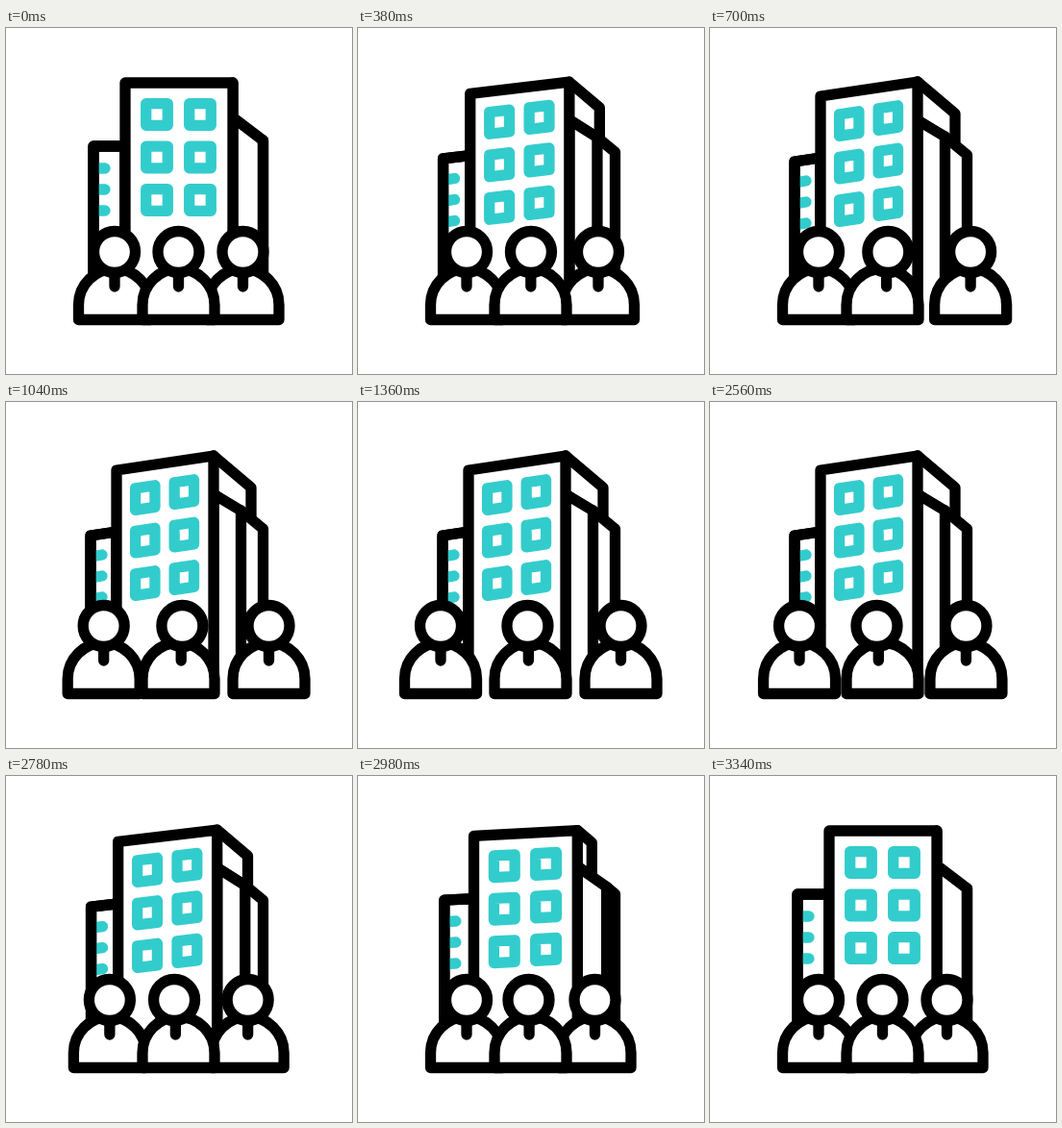
Write an HTML page with a canvas that moves like this. It is 360x360 px and loops after 3.36 s.

```html
<!DOCTYPE html>
<html lang="en">
<head>
<meta charset="utf-8">
<title>Office team</title>
<style>
  html, body { margin: 0; width: 100%; height: 100%; overflow: hidden; background: #fff; }
  canvas { display: block; width: 360px; height: 360px; }
</style>
</head>
<body>
<canvas id="stage" width="360" height="360"></canvas>
<script>
const ctx = document.getElementById('stage').getContext('2d');
const LOOP = 3360, CYAN = '#33cccc', GROUND = 292;

const mix = (a, b, p) => a + (b - a) * p;

// Smooth 0..1 ramp between two times
function ramp(t, start, end) {
  const u = Math.min(1, Math.max(0, (t - start) / (end - start)));
  return u * u * (3 - 2 * u);
}

function shape(points, { closed = false, fill = '#fff', stroke = '#000' } = {}) {
  ctx.beginPath();
  points.forEach(([x, y]) => ctx.lineTo(x, y));
  if (closed) ctx.closePath();
  if (fill) { ctx.fillStyle = fill; ctx.fill(); }
  ctx.strokeStyle = stroke;
  ctx.stroke();
}

function drawBuilding(p) {
  const left = mix(124, 115, p), right = mix(236, 216, p);
  const topLeft = mix(57, 71, p), topRight = mix(57, 56, p);
  const sideX = mix(236, 255, p), sideY = mix(57, 89, p);
  const wingX = mix(267.5, 244.5, p), wingY = mix(117, 113, p);
  const joinY = mix(93, 96, p), farY = mix(117, 132, p);
  const annexX = mix(91, 88, p), annexY = mix(123, 139, p);

  // Left annex with its half-hidden windows
  const annex = [[left, GROUND], [left, mix(123, 135, p)], [annexX, annexY], [annexX, GROUND]];
  shape(annex);
  for (let i = 0; i < 3; i++) {
    const y = mix(146, 160, p) + i * 22;
    shape([[annexX + 6, y], [mix(103, 100, p), y - p]], { fill: null, stroke: CYAN });
  }
  shape(annex, { fill: null });

  // Side wall, then the lower wing in front of it
  shape([[right, topRight], [sideX, sideY], [sideX, mix(joinY, 121, p)], [right, joinY]]);
  shape([[right, GROUND], [right, joinY], [wingX, wingY], [267.5, farY], [267.5, GROUND]]);
  shape([[wingX, wingY], [wingX, GROUND]]);

  // Front wall
  shape([[left, GROUND], [left, topLeft], [right, topRight], [right, GROUND]]);
  const onWall = (x, y) => {
    const u = (x - 124) / 112;
    return [mix(left, right, u), y - 57 + mix(topLeft, topRight, u)];
  };
  for (const x of [157, 202]) {
    for (const y of [90, 134.5, 179]) {
      const corners = [[-1, -1], [1, -1], [1, 1], [-1, 1]];
      shape(corners.map(([a, b]) => onWall(x + a * 11.3, y + b * 11.3)),
        { closed: true, stroke: CYAN });
    }
  }
}

function drawPerson(x, look = 0) {
  ctx.fillStyle = '#fff';
  ctx.strokeStyle = '#000';
  ctx.beginPath();
  ctx.moveTo(x - 37.5, 303.5);
  ctx.arc(x, 288, 37.5, Math.PI, 0);
  ctx.lineTo(x + 37.5, 303.5);
  ctx.closePath();
  ctx.fill();
  ctx.stroke();
  shape([[x + look * 0.7, 255], [x + look * 0.7, 269]]);
  ctx.beginPath();
  ctx.arc(x + look, 233, 21.5, 0, 7);
  ctx.fill();
  ctx.stroke();
}

function draw(t) {
  ctx.fillStyle = '#fff';
  ctx.fillRect(0, 0, 360, 360);
  ctx.lineWidth = 11.3;
  ctx.lineJoin = ctx.lineCap = 'round';

  const back = ramp(t, 2370, 2940);
  const rightStep = 27 * (ramp(t, 260, 800) - back);
  const leftStep = 27 * (ramp(t, 800, 1340) - back);
  const look = 6.5 * ramp(t, 300, 800) - 12.5 * ramp(t, 800, 1620) + 6 * ramp(t, 2540, 3260);

  drawBuilding(ramp(t, 0, 530) - ramp(t, 2600, 3260));
  drawPerson(113 - leftStep);
  drawPerson(246.5 + rightStep);
  drawPerson(179.5, look);
}

function tick() {
  draw(performance.now() % LOOP);
  requestAnimationFrame(tick);
}
tick();
</script>
</body>
</html>
```
